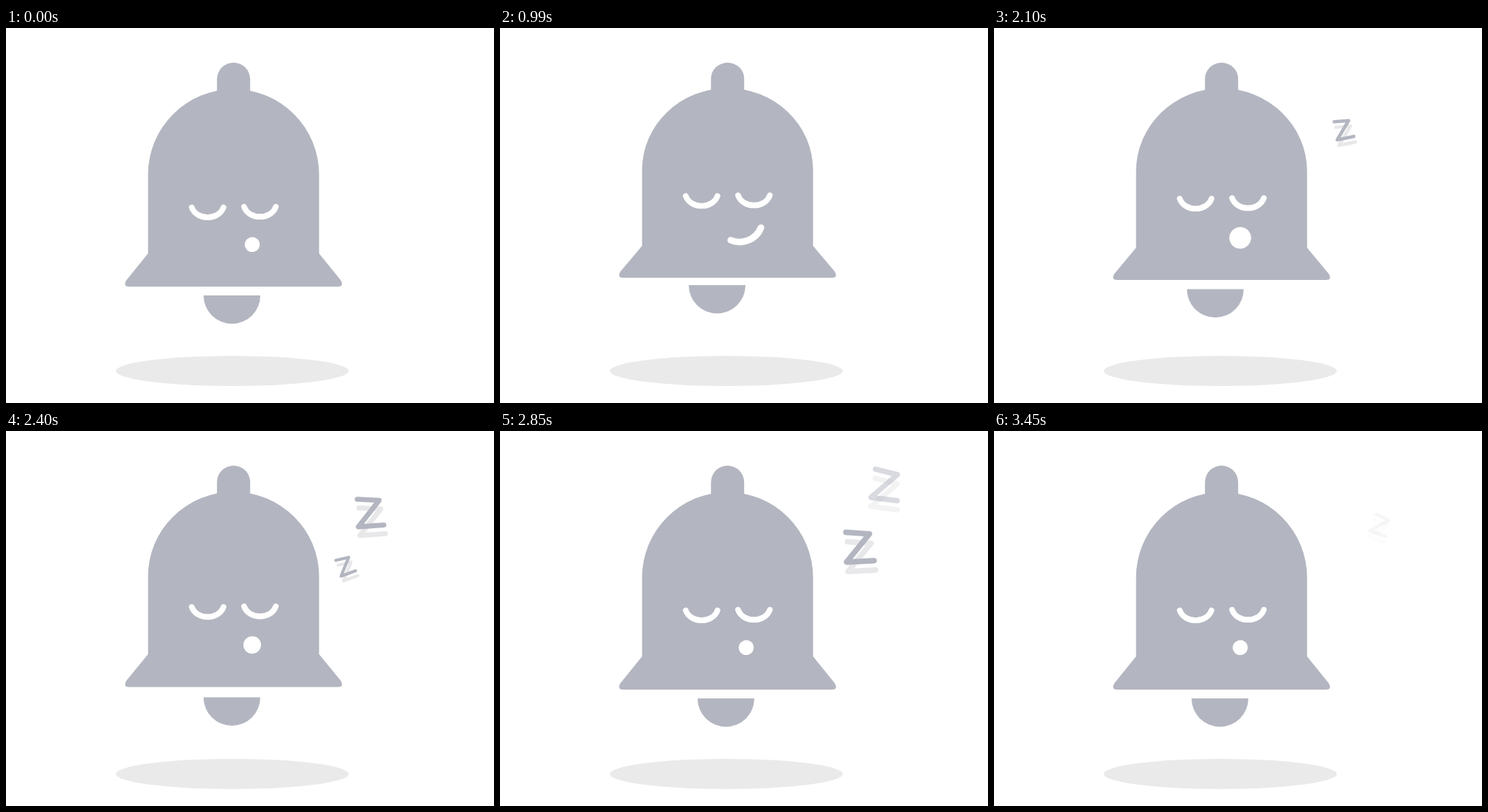
Recreate the animation shown at these times as an HTML page with a canvas. Size 662x509 px, loop 3630 ms.

```html
<!DOCTYPE html>
<html lang="en">
<head>
<meta charset="utf-8">
<title>Sleeping bell</title>
<style>
  html, body { margin: 0; width: 100%; height: 100%; overflow: hidden; background: #fff; }
  canvas { display: block; }
</style>
</head>
<body>
<canvas id="stage" width="662" height="509"></canvas>
<script>
const ctx = document.getElementById('stage').getContext('2d');
const LOOP = 3630, STEP = 30, LAST = 3450;
const GREY = '#b3b6c0', PALE = '#e8e8ea', FLOOR = '#eaeaea';

const mix = (a, b, k) => a + (b - a) * k;
const span = (t, a, b) => Math.min(1, Math.max(0, (t - a) / (b - a)));
const easeOut = (p, n) => 1 - (1 - p) ** n;
const swing = p => (1 - Math.cos(Math.PI * p)) / 2;

function line(color, width, build) {
  ctx.strokeStyle = color;
  ctx.lineWidth = width;
  ctx.beginPath();
  build();
  ctx.stroke();
}

function fill(color, build) {
  ctx.fillStyle = color;
  ctx.beginPath();
  build();
  ctx.fill();
}

function drawBell(breath) {
  ctx.save();
  ctx.translate(308.7, 47);
  ctx.scale(1, 1 - .0395 * breath);
  fill(GREY, () => {
    ctx.arc(0, 22.5, 22.5, Math.PI, 0);
    ctx.lineTo(22.5, 63);
    ctx.lineTo(-22.5, 63);
  });
  fill(GREY, () => {
    ctx.arc(0, 152, 116, Math.PI, 0);
    ctx.lineTo(116, 259);
    ctx.lineTo(145.5, 295.5);
    ctx.quadraticCurveTo(150, 304, 142, 304);
    ctx.lineTo(-142, 304);
    ctx.quadraticCurveTo(-150, 304, -145.5, 295.5);
    ctx.lineTo(-116, 259);
  });
  ctx.restore();
}

function drawEye(x, y) {
  line('#fff', 7.7, () => {
    ctx.moveTo(x - 21.5, y);
    ctx.bezierCurveTo(x - 15, y + 18, x + 15, y + 18, x + 21.5, y);
  });
}

// An open round mouth stretches into a smile.
function drawMouth(breath, smile) {
  const k = Math.max(.01, smile), y = 294 - 12 * breath;
  const at = (dx, dy) => [334 + dx * k, y + dy * k];
  const width = mix(20 + 12 * breath, 9, easeOut(smile, 2));
  line('#fff', width, () => {
    ctx.moveTo(...at(-21, 6));
    ctx.bezierCurveTo(...at(-8, 12), ...at(13, 7), ...at(20, -11));
  });
}

function zPath(dx, dy) {
  ctx.moveTo(dx - 17.5, dy - 19);
  ctx.lineTo(dx + 12.5, dy - 17);
  ctx.lineTo(dx - 16.5, dy + 19);
  ctx.lineTo(dx + 18.5, dy + 17);
}

// A Z drifts up a shallow arc, swelling and tilting, then fades.
function drawSnore(p, from, to, tilt, swell) {
  if (p <= 0 || p >= 1) return;
  const size = 1.08 * Math.sin(.2 + swell * p);
  ctx.save();
  ctx.translate(mix(from.x, to.x, p), mix(from.y, to.y, p) - 3 * Math.sin(Math.PI * p));
  ctx.rotate(mix(-tilt, tilt, p) * Math.PI / 180);
  ctx.scale(size, size);
  ctx.globalAlpha = span(p, 0, .1) * span(p, 1, .7);
  line(PALE, 7, () => zPath(2, 12));
  line(GREY, 7, () => zPath(0, 0));
  ctx.restore();
}

function draw(t) {
  const exhale = t >= 1780;
  const breath = exhale ? 1 - swing(span(t, 1780, 2760)) : easeOut(span(t, 30, 980), 2.35);
  const sway = exhale ? 1 - swing(span(t, 1790, 2430)) : easeOut(span(t, 30, 980), 2);
  const smile = exhale ? 1 - swing(span(t, 1780, 2040)) : easeOut(span(t, 30, 700), 2.3);

  fill('#fff', () => ctx.rect(0, 0, 662, 509));
  fill(FLOOR, () => ctx.ellipse(307, 465.5, 158, 20.5, 0, 0, 2 * Math.PI));
  drawBell(breath);
  fill(GREY, () => {
    const lift = mix(breath, sway, .65);
    ctx.arc(306.5 - 12 * sway, 363 - 14 * lift, 38.5, 0, Math.PI);
  });

  const eyeY = 243.5 - 15.5 * breath;
  drawEye(273.5, eyeY);
  drawEye(344.5, eyeY - .8);
  drawMouth(breath, smile);
  drawSnore(span(t, 1830, 3030), { x: 457, y: 163 }, { x: 535, y: 60 }, 15, 2);
  drawSnore(span(t, 2190, 3500), { x: 448, y: 196 }, { x: 527, y: 126 }, 25, 2.4);
}

ctx.lineCap = ctx.lineJoin = 'round';
const start = performance.now();
function tick() {
  const t = (performance.now() - start) % LOOP;
  draw(Math.min(LAST, Math.floor(t / STEP) * STEP));
  requestAnimationFrame(tick);
}
tick();
</script>
</body>
</html>
```
